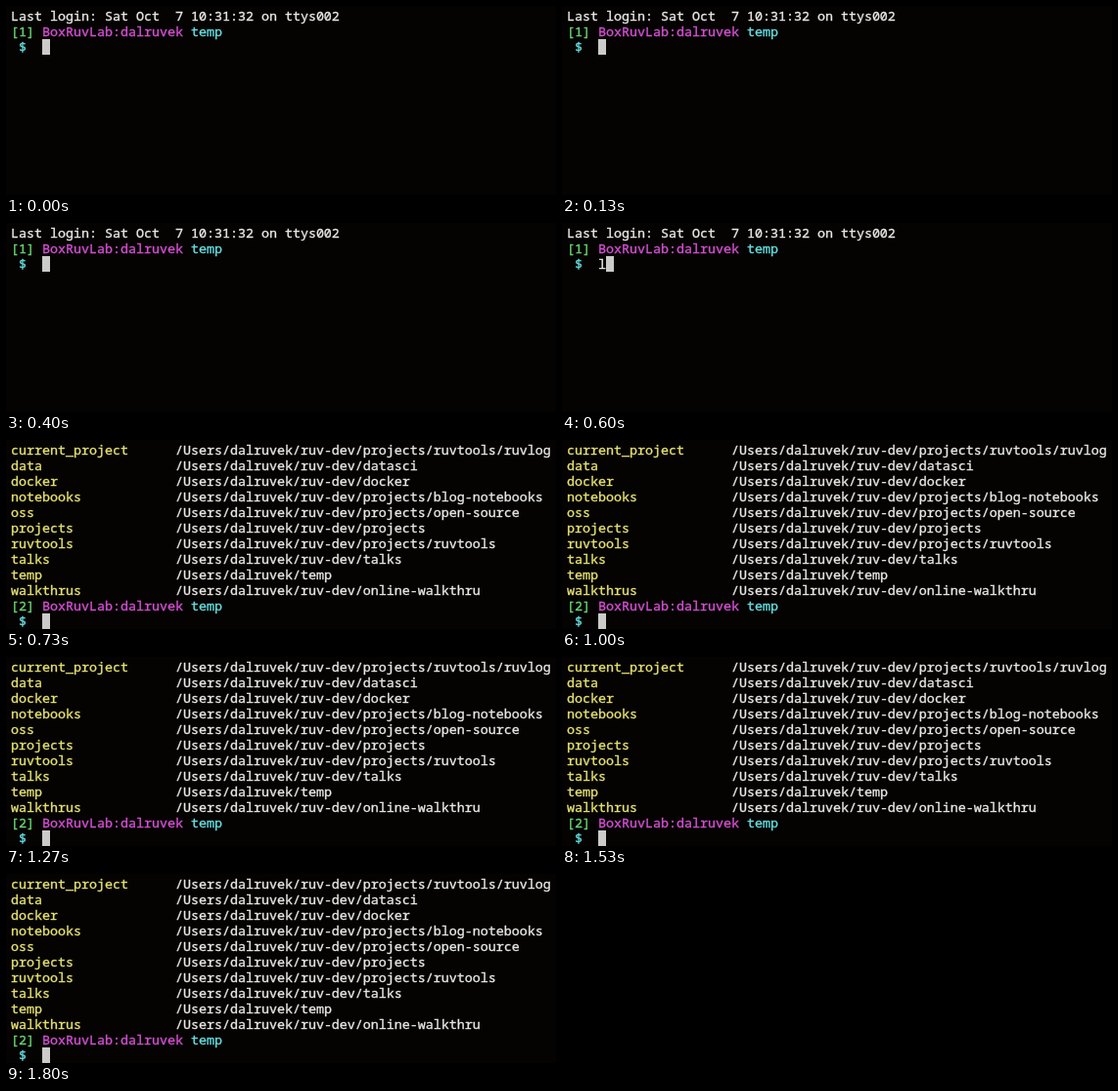
These frames come from a looping animation (562x194 px, 1870 ms). An HTML page:

```html
<!DOCTYPE html>
<html lang="en">
<head>
<meta charset="utf-8">
<title>Terminal</title>
<style>
  html, body { margin: 0; width: 100%; height: 100%; overflow: hidden; background: #040301; }
  pre {
    position: absolute; left: 5px; top: 2px; margin: 0;
    font: 13.333px/16px "Noto Sans Mono", "DejaVu Sans Mono", monospace;
    font-variant-ligatures: none;
    -webkit-text-stroke: 0.35px currentColor;
    color: #e9e9e6;
  }
  .count { color: #6ad573; }
  .host { color: #d54fd4; }
  .dir { color: #66dfe2; }
  .key { color: #e6e272; }
  .cursor { display: inline-block; width: 8px; height: 16px; vertical-align: top; background: #cbcbc9; }
</style>
</head>
<body>
<pre id="screen"></pre>
<script>
const LOOP = 1870, TYPE_AT = 600, RUN_AT = 730;
const home = "/Users/dalruvek/";
const bookmarks = {
  current_project: "ruv-dev/projects/ruvtools/ruvlog",
  data: "ruv-dev/datasci",
  docker: "ruv-dev/docker",
  notebooks: "ruv-dev/projects/blog-notebooks",
  oss: "ruv-dev/projects/open-source",
  projects: "ruv-dev/projects",
  ruvtools: "ruv-dev/projects/ruvtools",
  talks: "ruv-dev/talks",
  temp: "temp",
  walkthrus: "ruv-dev/online-walkthru"
};

const span = (cls, text = "") => `<span class="${cls}">${text}</span>`;
const prompt = (n, typed = "") =>
  `${span("count", `[${n}]`)} ${span("host", "BoxRuvLab:dalruvek")} ${span("dir", "temp")}\n` +
  ` ${span("dir", "$")}  ${typed}${span("cursor")}`;

const login = "Last login: Sat Oct  7 10:31:32 on ttys002\n";
const listing = Object.entries(bookmarks)
  .map(([key, path]) => span("key", key.padEnd(21)) + home + path + "\n")
  .join("");
const views = [login + prompt(1), login + prompt(1, "l"), listing + prompt(2)];

const screen = document.getElementById("screen");
const start = performance.now();
let shown = -1;

function draw() {
  const t = (performance.now() - start) % LOOP;
  const view = t < TYPE_AT ? 0 : t < RUN_AT ? 1 : 2;
  if (view !== shown) screen.innerHTML = views[shown = view];
  requestAnimationFrame(draw);
}
draw();
</script>
</body>
</html>
```
